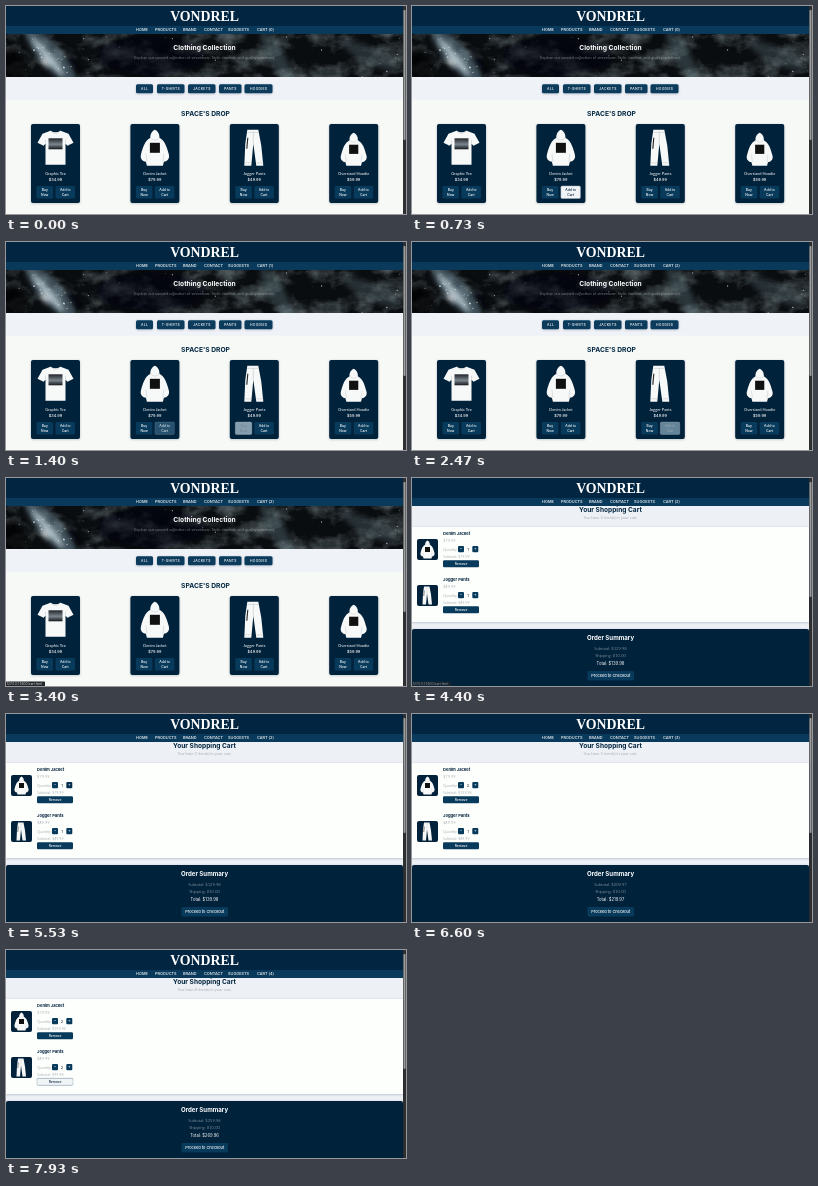
Write an HTML page that moves like this. It is 400 by 208 pixels and loops after 8000 ms.

```html
<!DOCTYPE html>
<html lang="en">
<head>
<meta charset="utf-8">
<title>Clothing shop</title>
<style>
  html, body { margin: 0; width: 100%; height: 100%; overflow: hidden; background: #f6f9f6; }
  svg { display: block; width: 100vw; height: 100vh; }
  text { font-family: Inter, sans-serif; }
  .logo { font: bold 13.8px "Liberation Serif", serif; }
  .heading { font-weight: 700; }
  .nav { font-weight: 500; }
  .light { font-family: Lato, sans-serif; }
  .thin { font-family: Lato, sans-serif; font-weight: 300; }
</style>
</head>
<body>
<svg viewBox="0 0 400 208" preserveAspectRatio="none">
  <defs>
    <clipPath id="heroClip"><rect y="28" width="397" height="43"/></clipPath>
    <filter id="soft" x="-50%" y="-100%" width="200%" height="300%"><feGaussianBlur stdDeviation="2.6"/></filter>
    <filter id="shadow" x="-20%" y="-20%" width="140%" height="150%">
      <feDropShadow dx="0" dy=".6" stdDeviation=".8" flood-color="#02233f" flood-opacity=".25"/>
    </filter>
    <filter id="clouds" x="0" y="0" width="100%" height="100%">
      <feTurbulence type="fractalNoise" baseFrequency=".035 .05" numOctaves="5" seed="8"/>
      <feColorMatrix values="0 0 0 0 .38  0 0 0 0 .48  0 0 0 0 .5  2.2 0 0 0 -.95"/>
    </filter>
    <linearGradient id="print" x2="0" y2="1">
      <stop stop-color="#20252b"/><stop offset=".55" stop-color="#7b858c"/><stop offset="1" stop-color="#15191d"/>
    </linearGradient>
    <g id="tee">
      <path d="M13 1Q18 4 23 1L31 4 36 13 30 16 28 14V35H8V14L6 16 0 13 5 4Z" fill="#f7f8f8"/>
      <path d="M13 1Q18 6 23 1M8 14V10M28 14V10" fill="none" stroke="#c8cdd1" stroke-width=".6"/>
      <rect x="11" y="8.5" width="14" height="11" fill="url(#print)"/>
    </g>
    <g id="hoodie">
      <path d="M18 0C21 1 23 5 22.5 8C28 11 30 17 32 25C33 29 30 32 27 32L26 36H10L9 32C6 32 3 29 4 25C6 17 8 11 13.5 8C13 5 15 1 18 0Z" fill="#f7f8f8"/>
      <path d="M14 8.5Q18 12 22 8.5M10 32L9 24M26 32L27 24" fill="none" stroke="#c8cdd1" stroke-width=".6"/>
      <rect x="13" y="13" width="10" height="10" fill="#111"/>
    </g>
    <g id="pants">
      <path d="M11 0H22L25 16 27 36H20L17 14 15 36H8L9 14Z" fill="#f7f8f8"/>
      <path d="M11 2.5H22M17 2.5V14M9 33H15M20 33H27" fill="none" stroke="#bfc5ca" stroke-width=".6"/>
      <path d="M11.5 8L10.5 19" stroke="#222" stroke-width="1.1"/>
    </g>
    <g id="hero" clip-path="url(#heroClip)"></g>
  </defs>
  <g id="page"></g>
</svg>
<script>
const LOOP = 8000;
const NAVY = '#02213a', HEADER = '#022641', BLUE = '#083a5c', GREY = '#7d858d';
const PRODUCTS = {
  tee: { name: 'Graphic Tee', price: 34.99 },
  denim: { name: 'Denim Jacket', price: 79.99, art: 'hoodie' },
  pants: { name: 'Jogger Pants', price: 49.99 },
  hoodie: { name: 'Oversized Hoodie', price: 59.99, size: 33 }
};
const NAV = { HOME: 130, PRODUCTS: 149, BRAND: 177, CONTACT: 198, SUGGESTS: 222, CART: 251 };
const STATIC_NAV = { HOME: 144, PRODUCTS: 163, BRAND: 191, CONTACT: 212, CART: 237 };
const FILTERS = [['ALL', 130, 17], ['T-SHIRTS', 151, 27.5], ['JACKETS', 182, 27.5], ['PANTS', 213, 22.5], ['HOODIES', 238.5, 28]];

const page = document.getElementById('page');
const money = value => '$' + value.toFixed(2);
const ramp = (t, start, length = 300) => Math.min(1, Math.max(0, (t - start) / length));
const hover = (t, enter, leave) => ramp(t, enter) - ramp(t, leave);
const since = (t, ...times) => times.filter(time => t >= time).length;

const rect = (x, y, w, h, fill, rx = 0, extra = '') =>
  `<rect x="${x}" y="${y}" width="${w}" height="${h}" rx="${rx}" fill="${fill}" ${extra}/>`;

// y is the vertical centre of the capitals
const text = (str, x, y, size, fill, cls = '', anchor = 'start') =>
  `<text x="${x}" y="${y + size * .36}" font-size="${size}" fill="${fill}" class="${cls}" text-anchor="${anchor}">${str}</text>`;
const centered = (str, x, y, size, fill, cls) => text(str, x, y, size, fill, cls, 'middle');

const art = (id, x, y, size) =>
  `<use href="#${PRODUCTS[id].art || id}" transform="translate(${x} ${y}) scale(${size / 36})"/>`;

// glow fades the button towards its white hover look
function button(x, y, w, h, lines, size = 3.4, glow = 0) {
  const face = (fill, ink) => rect(x, y, w, h, fill, 1.3) + lines.map((line, i) =>
    centered(line, x + w / 2, y + h / 2 + (i - (lines.length - 1) / 2) * 4.1, size, ink, 'nav')).join('');
  return face(BLUE, '#fff') + (glow ? `<g opacity="${glow}">${face('#f1f4f6', NAVY)}</g>` +
    rect(x, y, w, h, 'none', 1.3, `stroke="#9fb0bd" stroke-width=".5" opacity="${Math.sqrt(glow)}"`) : '');
}

function buildHero() {
  let seed = 17;
  const random = () => (seed = seed * 16807 % 2147483647) / 2147483647;
  const spread = () => random() + random() + random() - 1.5;
  const glow = (x, y, rx, ry, angle, fill, opacity) =>
    `<ellipse cx="${x}" cy="${y}" rx="${rx}" ry="${ry}" fill="${fill}" opacity="${opacity}" filter="url(#soft)" transform="rotate(${angle} ${x} ${y})"/>`;
  const star = (x, y, size) =>
    `<circle cx="${x}" cy="${y}" r="${.15 + random() ** 5 * size}" fill="#e6eff2" opacity="${.2 + random() * .65}"/>`;
  let out = rect(0, 28, 397, 43, '#0a0d10') + rect(0, 28, 397, 43, '#000', 0, 'filter="url(#clouds)" opacity=".6"') +
    glow(145, 50, 55, 20, 0, '#040608', .6) + glow(8, 58, 18, 14, 45, '#030506', .7) +
    glow(45, 50, 36, 11, 48, '#647c8a', .6) + glow(42, 51, 25, 3.5, 50, '#c6d6de', .8) +
    glow(39, 56, 6, 3, 50, '#fff', .6) + glow(68, 56, 24, 3, 58, '#020507', .6) +
    glow(270, 50, 28, 8, 60, '#5c747b', .4) + glow(365, 50, 30, 8, 25, '#5c7078', .35);
  for (let i = 0; i < 170; i++) out += star(random() * 397, 28 + random() * 43, .6);
  for (let i = 0; i < 110; i++) {
    const along = spread() * 28, across = spread() * 12;
    out += star(45 + along * .67 - across * .74, 50 + along * .74 + across * .67, .8);
  }
  document.getElementById('hero').innerHTML = out;
}

function header(nav, count, thumbHeight) {
  return rect(0, 0, 400, 20, HEADER) + rect(0, 20, 400, 8, '#0a3a5b') +
    `<text class="logo" x="198.5" y="14.8" fill="#fff" text-anchor="middle">VONDREL</text>` +
    Object.entries(nav).map(([label, x]) =>
      text(label === 'CART' ? `CART (${count})` : label, x, 24, 3.9, '#fff', 'nav')).join('') +
    rect(397, 0, 3, 208, '#2d2f31') + rect(397.5, 4, 2, thumbHeight, '#9b9d9f', .8);
}

function card(id, x, buyGlow, addGlow) {
  const { name, price, size = 36 } = PRODUCTS[id];
  return rect(x, 118, 49, 79, NAVY, 2, 'filter="url(#shadow)"') + art(id, x + 24.5 - size / 2, 159.8 - size, size) +
    centered(name, x + 24.5, 168, 4, '#fff', 'light') +
    centered(money(price), x + 24.5, 174, 3.9, '#fff', 'nav') +
    button(x + 5.5, 180, 16.5, 12.5, ['Buy', 'Now'], 3.4, buyGlow) +
    button(x + 24.5, 180, 19.5, 12.5, ['Add to', 'Cart'], 3.4, addGlow);
}

function shopPage(t) {
  const buy = { pants: hover(t, 1240, 1470) };
  const add = { denim: hover(t, 400, 1140), pants: hover(t, 1550, 2290) };
  return rect(0, 0, 400, 208, '#f6f9f6') + rect(0, 71, 397, 22.5, '#eff2f7') + header(NAV, since(t, 930, 2070), 130) +
    '<use href="#hero"/>' +
    centered('Clothing Collection', 198.5, 42, 6.7, '#fff', 'heading') +
    centered('Explore our curated collection of streetwear. Style, comfort, and quality redefined.', 198.5, 51.3, 4, '#b9c1c6', 'thin') +
    FILTERS.map(([label, x, w]) =>
      rect(x, 78.3, w, 8.9, BLUE, 1.5, 'filter="url(#shadow)"') +
      `<g letter-spacing=".3">${centered(label, x + w / 2 + .15, 82.8, 3.4, '#fff', 'nav')}</g>`).join('') +
    centered("SPACE'S DROP", 199.5, 107.5, 6.7, HEADER, 'heading') +
    Object.keys(PRODUCTS).map((id, i) => card(id, 25 + i * 99.4, buy[id], add[id])).join('');
}

function cartFrame(nav, count, note, panelBottom) {
  return rect(0, 0, 400, 208, '#edf0f5') + header(nav, count, 115) +
    centered('Your Shopping Cart', 198.5, 31.5, 6.6, HEADER, 'heading') +
    centered(note, 198.5, 40, 4.1, GREY, 'thin') +
    rect(0, 49, 397, panelBottom - 49, '#fdfffd', 0, 'filter="url(#shadow)"');
}

function summary(top, height, rows, subtotal) {
  const lines = [['Subtotal: ' + money(subtotal), '#c3ccd4'], ['Shipping: $10.00', '#c3ccd4'], ['Total: ' + money(subtotal + 10), '#fff']];
  return rect(0, top, 397, height, NAVY, 2, 'filter="url(#shadow)"') +
    centered('Order Summary', 198.5, top + 8.7, 6.1, '#fff', 'heading') +
    lines.map(([line, fill], i) => centered(line, 198.5, top + rows[i], 4.2, fill, i < 2 ? 'thin' : '')).join('') +
    button(175.5, top + rows[3], 46.5, 9.5, ['Proceed to Checkout'], 3.9);
}

const itemHead = (id, y, thumbY) =>
  rect(5, thumbY, 21, 21, NAVY, 2) + art(id, 6.5, thumbY + 1.5, 18) +
  text(PRODUCTS[id].name, 31, y, 4.1, NAVY, 'heading') +
  text(money(PRODUCTS[id].price), 31, y + 6.2, 4, GREY, 'thin');

function staticCart() {
  const item = (id, y, width) => itemHead(id, y, y) +
    text('Quantity: 1', 31, y + 12.3, 4, GREY, 'thin') +
    button(31, y + 16, width, 6.8, ['Remove'], 3.3);
  const suggestion = (x, w) => rect(x, 206, w, 4, NAVY, 1.5);
  return cartFrame(STATIC_NAV, 0, 'You have 2 items in your cart.', 123) +
    item('tee', 56, 24) + item('denim', 92, 27) +
    summary(130, 57, [19.7, 26.3, 34.3, 42.3], 114.98) +
    centered('You might also like', 198.5, 197.3, 6.1, HEADER, 'heading') +
    suggestion(162, 31) + suggestion(199, 36);
}

function liveItem(id, y, quantity, plusHover, removeGlow) {
  const square = (x, sign, fill) => rect(x, y + 12, 6, 6.2, fill, 1) + centered(sign, x + 3, y + 15, 4, '#fff', 'nav');
  return itemHead(id, y, y + 5) +
    text('Quantity:', 31, y + 15.2, 3.7, GREY, 'thin') +
    square(46, '−', BLUE) + centered(quantity, 56, y + 15.2, 4, '#222') + square(60.3, '+', plusHover ? '#07304f' : BLUE) +
    text('Subtotal: ' + money(PRODUCTS[id].price * quantity), 31, y + 22.7, 3.7, GREY, 'thin') +
    button(31, y + 26.2, 36, 7, ['Remove'], 3.3, removeGlow);
}

function liveCart(t) {
  const denim = 1 + since(t, 5870), pants = 1 + since(t, 6870);
  const count = denim + pants;
  const subtotal = denim * PRODUCTS.denim.price + pants * PRODUCTS.pants.price;
  return cartFrame(NAV, count, `You have ${count} item(s) in your cart.`, 144) +
    liveItem('denim', 56, denim, t >= 5330 && t < 6400) +
    liveItem('pants', 102, pants, t >= 6670 && t < 7470, ramp(t, 7630)) +
    summary(151, 60, [19.3, 26, 34, 42], subtotal);
}

function statusBar(t) {
  const opacity = ramp(t, 3330, 70) - ramp(t, 4330, 200);
  return `<g opacity="${opacity}">${rect(0, 203.5, 39, 4.5, '#25282b', .5)}${text('127.0.0.1:5500/cart.html', .8, 205.8, 3.2, '#d5d8da')}</g>`;
}

let shown = '';
function frame(now) {
  const t = now % LOOP;
  const scene = t < 3600 ? shopPage(t) : t < 3670 ? staticCart() : liveCart(t);
  const markup = scene + statusBar(t);
  if (markup !== shown) page.innerHTML = shown = markup;
}

buildHero();
const start = performance.now();
(function tick() {
  frame(performance.now() - start);
  requestAnimationFrame(tick);
})();
</script>
</body>
</html>
```
